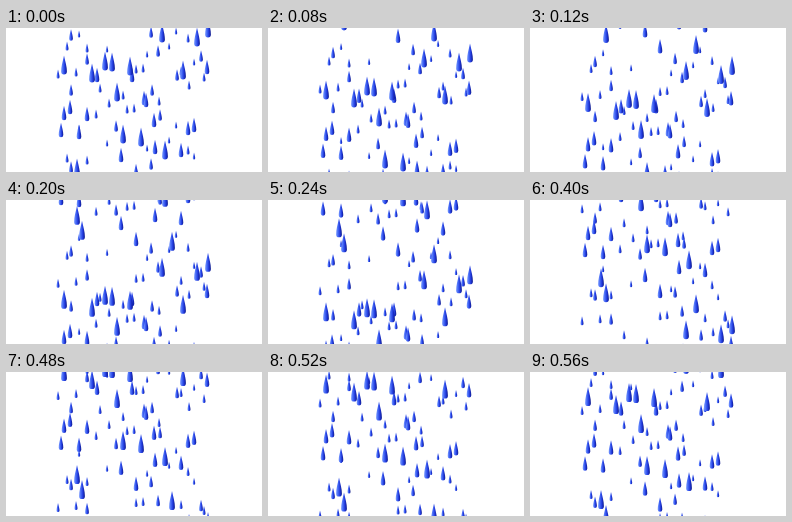
These frames come from a looping animation (256 by 144 pixels, 600 ms). An HTML page with a canvas:

```html
<!DOCTYPE html>
<html>
<head>
<meta charset="utf-8">
<title>Rain</title>
<style>
html, body { margin: 0; overflow: hidden; background: #fff; }
canvas { display: block; }
</style>
</head>
<body>
<canvas id="stage" width="256" height="144"></canvas>
<script>
const W = 256, H = 144, STEP = 40, LOOP = 600;
const ctx = document.getElementById('stage').getContext('2d');

// Depth layers, far to near: fall per loop, drop size, then x,y pairs at time 0.
const layers = [
  { fall: 94, w: 2.4, h: 7, drops: [101,21, 170,97, 73,6, 141,26, 163,18, 188,34] },
  { fall: 112, w: 3, h: 9, drops: [52,46, 94,60, 103,75, 61,18, 70,44, 81,20, 130,41, 128,80, 121,81,
    117,67, 137,40, 198,49, 183,57, 182,10, 175,43, 153,73, 90,86] },
  { fall: 132, w: 3.8, h: 11.5, drops: [145,4, 152,23, 65,7, 81,31, 195,28, 154,87, 146,62, 110,98, 65,62, 171,47] },
  { fall: 156, w: 4.6, h: 14.5, drops: [55,102, 64,79, 81,86, 91,47, 126,47, 73,104, 130,143, 201,39, 182,100,
    188,97, 175,122, 148,92, 149,119, 138,70, 140,72, 115,127, 58,85] },
  { fall: 187, w: 5.8, h: 19, drops: [58,37, 86,45, 99,33, 106,34, 124,38, 177,42, 111,64, 117,106, 135,109,
    156,5, 191,9, 202,0, 71,140, 76,155, 166,166, 159,122] }
];

function drawDrop(x, y, w, h) {
  const r = w / 2, top = -h / 2, bottom = h / 2;
  ctx.save();
  ctx.translate(x, y);
  const shade = ctx.createLinearGradient(-r, 0, r, 0);
  shade.addColorStop(0, '#7c9cff');
  shade.addColorStop(0.35, '#4468f4');
  shade.addColorStop(0.65, '#2038dc');
  shade.addColorStop(1, '#0c1888');
  ctx.fillStyle = shade;
  ctx.beginPath();
  ctx.moveTo(0, top);
  ctx.bezierCurveTo(r * 0.5, top + h * 0.35, r, h * 0.1, r, bottom - r);
  ctx.arc(0, bottom - r, r, 0, Math.PI);
  ctx.bezierCurveTo(-r, h * 0.1, -r * 0.5, top + h * 0.35, 0, top);
  ctx.fill();
  ctx.restore();
}

function render(now) {
  const phase = Math.floor(now % LOOP / STEP) * STEP / LOOP;
  ctx.clearRect(0, 0, W, H);
  for (const { fall, w, h, drops } of layers) {
    for (let i = 0; i < drops.length; i += 2) {
      let y = (drops[i + 1] + phase * fall) % fall;
      if (y > fall - h) y -= fall;
      for (; y < H + h; y += fall) drawDrop(drops[i], y, w, h);
    }
  }
  requestAnimationFrame(render);
}
requestAnimationFrame(render);
</script>
</body>
</html>
```
